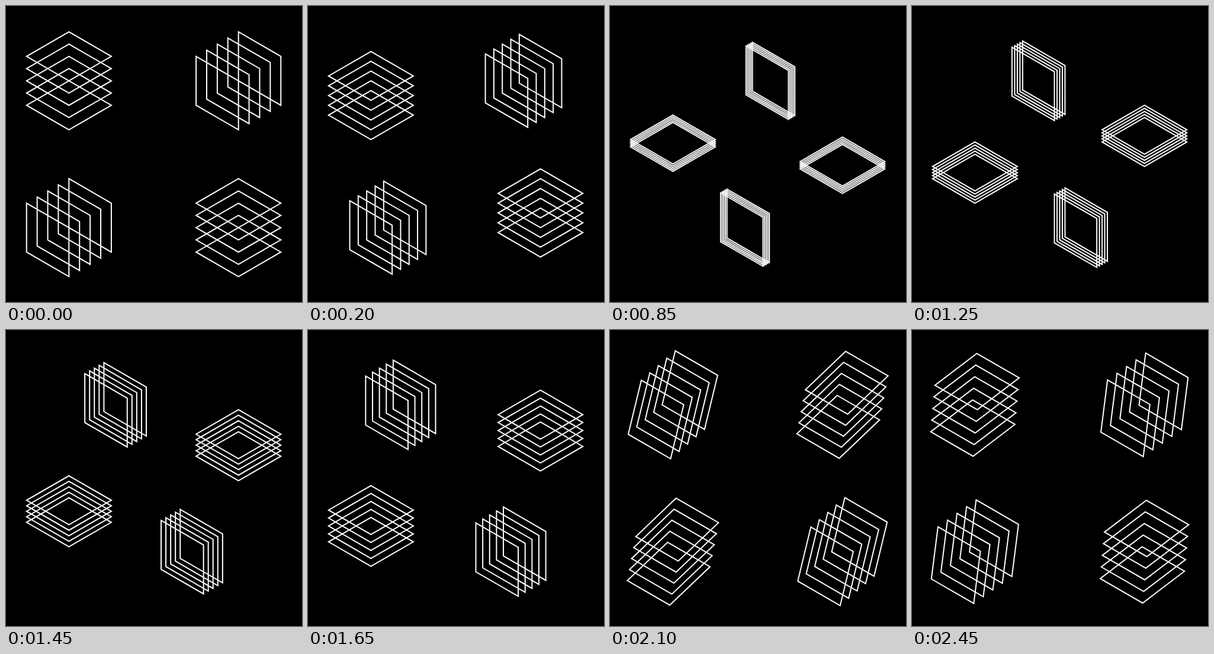
An HTML page for the animation above (2500 ms loop, 500x500 px).

```html
<!DOCTYPE html>
<html lang="en">
<head>
<meta charset="utf-8">
<title>Isometric stacks</title>
<style>
  html, body { margin: 0; width: 100%; height: 100%; overflow: hidden; background: #000; }
  svg { display: block; width: 100%; height: 100%; }
  path { fill: none; stroke: #fff; stroke-width: 2; stroke-linejoin: miter; }
</style>
</head>
<body>
<svg viewBox="0 0 500 500"><path id="lines" transform="translate(249.5 250.4)"/></svg>
<script>
const EDGE = 82.67, LAYERS = 5;
const LOOP = 2500, SLIDE = 2000, STEP = 50;
const COS30 = Math.sqrt(3) / 2;

// Isometric cube edges: right-down, left-down, down
const RIGHT = [COS30 * EDGE, EDGE / 2];
const LEFT = [-COS30 * EDGE, EDGE / 2];
const DOWN = [0, EDGE];
const HOME = [2 * COS30 * EDGE, 1.5 * EDGE];

const mix = (u, a, v, b) => [u[0] * a + v[0] * b, u[1] * a + v[1] * b];

function square(center, side) {
  const corner = (a, b) => {
    const [x, y] = mix(center, 1, mix(RIGHT, a / 2, side, b / 2), 1);
    return x.toFixed(2) + ' ' + y.toFixed(2);
  };
  return `M${corner(-1, -1)}L${corner(1, -1)}L${corner(1, 1)}L${corner(-1, 1)}Z`;
}

function stack(center, side, axis) {
  let d = '';
  for (let i = 0; i < LAYERS; i++) {
    d += square(mix(center, 1, axis, i / (LAYERS - 1) - 0.5), side);
  }
  return d;
}

function scene(t) {
  const move = Math.min(t / SLIDE, 1);
  const turn = Math.max((t - SLIDE) / (LOOP - SLIDE), 0);
  const angle = turn * Math.PI / 2;
  const way = 1 - 2 * move;
  const spread = Math.abs(way);

  // Squares rotate about RIGHT while their centres slide straight to the new axis
  const pair = (center, from, to) => {
    const side = mix(from, Math.cos(angle), to, Math.sin(angle));
    const axis = mix(to, (1 - turn) * spread, from, turn * spread);
    return stack(center, side, axis) + stack(mix(center, -1, center, 0), side, axis);
  };

  return pair([-HOME[0], -HOME[1] * way], LEFT, DOWN)
       + pair([HOME[0] * way, -HOME[1]], DOWN, LEFT);
}

const lines = document.getElementById('lines');
const start = performance.now();

function draw() {
  const t = performance.now() - start;
  const tick = Math.floor((t + 1) / STEP) * STEP;
  lines.setAttribute('d', scene(tick % LOOP));
  requestAnimationFrame(draw);
}
draw();
</script>
</body>
</html>
```
